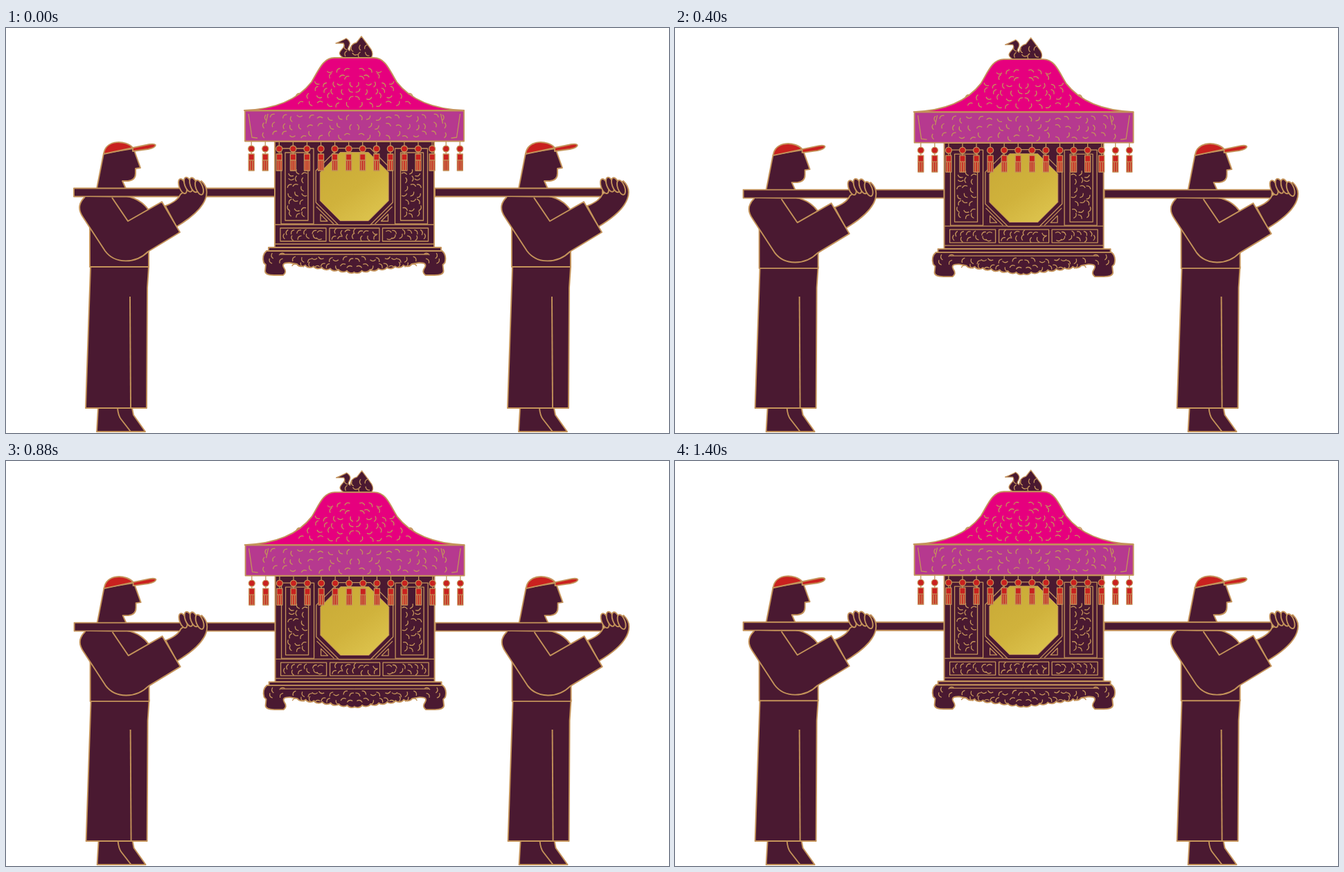
These frames come from a looping animation (957 px wide and 585 px high, 1440 ms). An HTML page:

```html
<!DOCTYPE html>
<html>
<head>
<meta charset="utf-8">
<style>
  html, body { margin: 0; width: 100%; height: 100%; overflow: hidden; background: #fff; }
  svg { display: block; width: 957px; height: 585px; }
  #all { fill: #4a1931; stroke: #c4935a; stroke-width: 1.9; stroke-linejoin: round; }
  .fine { stroke-width: 1.3; }
  .line { fill: none; }
  .red { fill: #c9211f; }
  .roof { fill: #e6007e; }
  .band { fill: #b6398f; }
  .glass { fill: url(#gold); stroke-width: 1; }
</style>
</head>
<body>
<svg viewBox="0 0 957 585">
  <linearGradient id="gold" x2=".7" y2="1">
    <stop stop-color="#c8a936"/><stop offset=".6" stop-color="#d0b23c"/><stop offset="1" stop-color="#dcc24c"/>
  </linearGradient>
  <g id="all"><g id="legs"></g><g id="load"></g></g>
</svg>
<script>
const [all, legs, load] = ['all', 'legs', 'load'].map(id => document.getElementById(id));
const CENTER = 502.75, STRIDE = 609, STEP = 480, TICK = 40, SAG = 3.2;

const repeat = (n, f) => Array.from({ length: n }, (_, i) => f(i)).join('');
const path = (d, cls = '') => `<path class="${cls}" d="${d}"/>`;
const rect = (x, y, w, h, cls) => path(`M${x} ${y}h${w}v${h}h${-w}z`, cls);
const mirrored = s => `${s}<g transform="matrix(-1 0 0 1 ${2 * CENTER} 0)">${s}</g>`;
const twice = s => `${s}<g transform="translate(${STRIDE})">${s}</g>`;

let seed = 11;
const random = () => (seed = seed * 16807 % 2147483647) / 2147483647;

// Short curved strokes, one per cell of a loose grid
function carving(x, y, w, h, cell = 12) {
  const cols = Math.round(w / cell), rows = Math.round(h / cell) || 1;
  return path(repeat(cols * rows, i => {
    const px = x + (i % cols + .25 + random() / 2) * w / cols;
    const py = y + (Math.floor(i / cols) + .25 + random() / 2) * h / rows;
    const a = random() * Math.PI, dx = 4 * Math.cos(a), dy = 4 * Math.sin(a);
    return `M${px - dx} ${py - dy}Q${px - dy} ${py + dx} ${px + dx} ${py + dy}`;
  }), 'line fine');
}

const panel = (x, y, w, h) => rect(x, y, w, h, 'line fine') + carving(x + 3, y + 2, w - 6, h - 4, 10);

function octagon(cy, r, cls) {
  const points = repeat(8, i => {
    const a = (i + .5) * Math.PI / 4;
    return `${CENTER + r * Math.cos(a)},${cy + r * Math.sin(a)} `;
  });
  return `<polygon class="${cls}" points="${points}"/>`;
}

const trousers =
  path('M133 549L131 583H201L184 559 182 549Z') +
  path('M161 549Q162 560 166 565L180 583', 'line') +
  path('M122 345L115 549H203L204 375 206 345Z') +
  path('M179 388L180 549', 'line');

const torso =
  path('M121 285V345H206V263Q196 249 179 244L150 238H118Z') +
  path('M141 181L131 232H173L168 221H176Q187 220 187 210V203L194 202 184 174Z') +
  path('M141 182C144 160 174 162 183 173L207 168C219 166 219 172 205 175L183 178V173Z', 'red');

const finger = i =>
  `<ellipse rx="5" ry="11" transform="translate(${255 + 8 * i} ${226 + 1.5 * (i - 1.3) ** 2}) rotate(-20)"/>`;

const arm =
  path('M230 257Q248 250 252 240L282 221C294 232 298 256 246 287Z') +
  repeat(4, finger) +
  path('M153 245L176 279 225 251 251 295 205 323C187 341 157 341 143 322L111 273Q100 257 114 244');

const swan =
  path('M476 22Q488 17 491 15C504 24 488 29 496 33Q497 23 506 21L513 12 519 20 527 31Q531 38 527 43H487C472 34 493 30 487 22Z', 'fine') +
  carving(488, 24, 38, 18, 9);

const canopy =
  path('M344 119C395 117 424 100 441 78C451 62 457 43 474 43H531C548 43 554 62 564 78C581 100 610 117 661 119Z', 'roof') +
  rect(345, 119.5, 316, 44, 'band') +
  mirrored(
    path('M350 124L355 158 363 159M378 124L375 138', 'line fine') +
    repeat(3, i => carving(462 - 22 * i, 56 + 19 * i, 40 + 22 * i, 20, 13)) +
    carving(366, 123, 136, 38, 13));

const foot = 'M504 322H376Q369 328 372 339L375 342 374 351Q374 357 387 357H400Q406 353 401 346 397 339 409 339L420 341';
const scallop = 'a7 5 0 0 0 12 1.6';

const cabin =
  rect(388, 164, 230, 153) +
  path('M388 284H618M388 312H618', 'line fine') +
  octagon(229, 60, 'fine') +
  octagon(229, 53.5, 'glass') +
  panel(467, 289, 72, 19) +
  mirrored(
    rect(397, 174, 47, 109, 'line fine') +
    rect(403, 180, 33, 98, 'line fine') + carving(406, 205, 27, 70, 10) +
    panel(396, 289, 66, 19) +
    path('M448 258L473 283M454 269V279H464Z', 'line fine')) +
  mirrored(
    path(foot + scallop.repeat(7)) +
    path('M396 327H504', 'line fine') +
    carving(376, 325, 28, 18) + carving(412, 329, 90, 20, 10)) +
  rect(379, 317, 249, 5);

const tassel = i => `<g class="red fine" transform="translate(${354.2 + 20.07 * i} 164)">` +
  path('M0 0V18') + '<circle cy="10.5" r="4.5"/>' + rect(-4, 18, 8, 24) +
  path('M-4 27H4M-1.5 28V42M1.5 28V42') + '</g>';

legs.innerHTML = twice(trousers);
load.innerHTML = twice(torso) +
  rect(98, 231.5, 290, 12) + rect(619, 231.5, 242, 12) +
  twice(arm) + cabin + swan + canopy + repeat(16, tassel);

function draw(now) {
  const phase = Math.floor(now % STEP / TICK) * TICK / STEP;
  const sag = SAG * (1 - Math.abs(2 * phase - 1) ** 2.6);
  load.setAttribute('transform', `translate(0 ${sag})`);
  all.setAttribute('transform', `translate(${phase > .35 ? .6 : 0} 0)`);
  requestAnimationFrame(draw);
}
draw(0);
</script>
</body>
</html>
```
